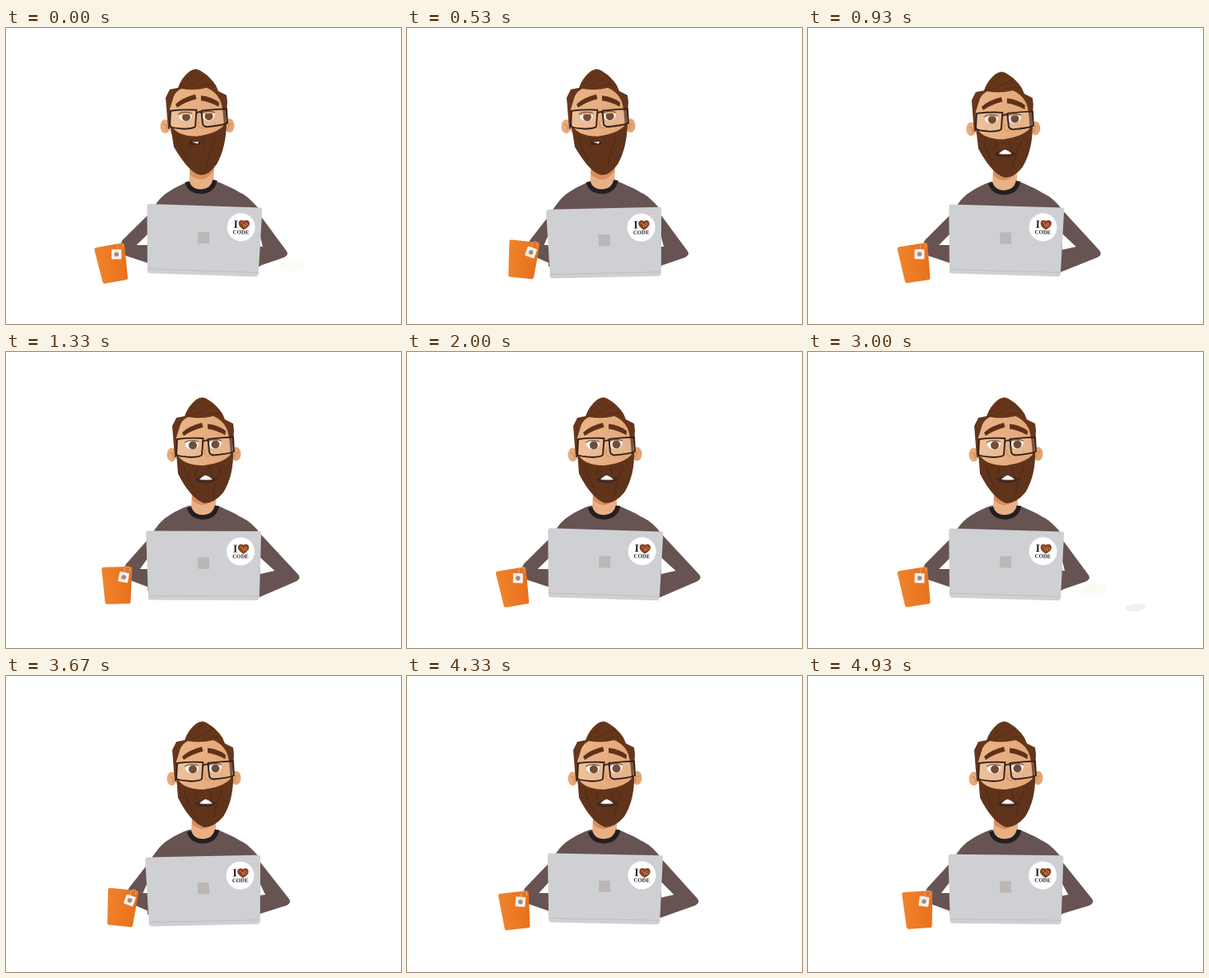
These frames come from a looping animation (480 px wide and 360 px high, 5 s). An HTML page:

```html
<!DOCTYPE html>
<html lang="en">
<head>
<meta charset="utf-8">
<title>Typing at the laptop</title>
<style>
  html, body { margin: 0; width: 100%; height: 100%; overflow: hidden; background: #fff; }
  svg { display: block; width: 480px; height: 360px; }
  text { font-family: "Liberation Serif", "Noto Serif", serif; font-weight: bold; fill: #2a2222; text-anchor: middle; }
</style>
</head>
<body>
<svg viewBox="0 0 480 360">
  <defs>
    <linearGradient id="skin">
      <stop offset="0" stop-color="#ebb588"/>
      <stop offset="1" stop-color="#e2a678"/>
    </linearGradient>
    <linearGradient id="orange">
      <stop offset="0" stop-color="#f0832d"/>
      <stop offset="1" stop-color="#e86f1b"/>
    </linearGradient>
  </defs>

  <ellipse id="slip" cx="347" cy="289" rx="16" ry="7" fill="#fbfbf5"/>
  <ellipse id="spot" cx="398" cy="311" rx="12.5" ry="4.5" fill="#f0f0f0" transform="rotate(-4 398 311)"/>

  <!-- body -->
  <path d="M222 187C206 193 194 200 186 209L172 228V290H309V222C299 209 285 198 257 187Z" fill="#665352"/>
  <path id="leftArm" fill="#665352"/>
  <path id="rightArm" fill="#665352"/>
  <path id="leftGap" fill="#fff"/>
  <path id="rightGap" fill="#fff"/>

  <g id="neck">
    <path d="M226 172L225 190Q228 199 240 199Q252 199 255 188V170Z" fill="#e9b085"/>
    <path d="M226 180Q241 194 255 176V171H226Z" fill="#d58f61"/>
    <path d="M222.500 189Q226 201 240 201Q254 200 256.500 187" fill="none" stroke="#231f20" stroke-width="5.500"/>
  </g>

  <g id="head">
    <ellipse cx="201.500" cy="125" rx="6" ry="8.500" fill="#e8ab7d"/>
    <ellipse cx="279.500" cy="124" rx="6" ry="8.500" fill="#e2a576"/>
    <path d="M199 123Q204 121 203 130M282 122Q277 121 278 129" fill="none" stroke="#c6814f"/>
    <path d="M205 128L202 90L207 80L217 78Q221 66 231 58Q238 53 244 57Q256 64 263 75L266 82L276 87L277 95L275 128Z" fill="#66361b"/>
    <path d="M218 79Q235 75 253 63M222 75Q232 64 239 57M261 74Q250 73 240 77" fill="none" stroke="#522a12" stroke-width=".8"/>
    <path d="M207 130V104L212 88Q215 82 221 79Q236 82 252 78Q262 82 267 91Q272 98 273 130Q267 144 240 144Q214 143 207 130Z" fill="url(#skin)"/>

    <path d="M214 98Q222 90 238 86L239.500 91.500Q226 95 216 102Z" fill="#5e3118"/>
    <path d="M245 87.500Q259 89 267 96L266.500 101Q256 95 245 93.500Z" fill="#5e3118"/>

    <path d="M218 113Q218 108 224 108L234 110Q234 118 227 118.500Q219 118 218 113ZM246 112Q247 108 253 107L262 109Q262 116 255 118Q248 118 246 112Z" fill="#fffaf5"/>
    <g id="pupils" fill="#59301b">
      <circle cx="227" cy="113.500" r="5"/>
      <circle cx="254.500" cy="112.500" r="5"/>
    </g>
    <path id="lids" d="M217 104H235V111Q225 109 217 112ZM245 103H263V109.500Q253 108 245 111Z" fill="#dda071"/>
    <path d="M217 110Q224 106 234 109M245 109Q253 105 262 108" fill="none" stroke="#70401f" stroke-width="1.200"/>
    <path d="M242 119Q240 128 248 127M259 126L262 125V120" fill="none" stroke="#cf8955" stroke-width=".9"/>

    <path id="beard" fill="#60331b"/>
    <path d="M216 139Q220 154 228 166M233 140L230 151M262 140Q254 158 252 173M247 139L250 150" fill="none" stroke="#4a2511" stroke-width=".8"/>
    <g id="smallMouth">
      <path d="M230 144Q238 141 246 145Q240 149 233 147Z" fill="#452213"/>
      <path d="M234 144L242 143.500L241 146Z" fill="#fff"/>
    </g>
    <g id="bigMouth">
      <path d="M229 155Q242 147 257 155Q249 160 242 159Q234 160 229 155Z" fill="#432a20"/>
      <path d="M235 155Q240 150 243 150Q247 151 251 155Q243 156 235 155Z" fill="#fff"/>
    </g>

    <g fill="rgba(255,255,255,.14)" stroke="#33221c" stroke-width="1.900" stroke-linejoin="round">
      <path d="M208 106Q224 104 239.500 105L238 125Q237 127.500 225 128Q210 127 207 125Z"/>
      <path d="M245.500 106Q262 104 276 103.500L277 121Q270 124 252 125.500Q248 125 247 122Z"/>
      <path d="M239.500 109Q243 106 246 108.500" fill="none"/>
    </g>
  </g>

  <g id="laptop">
    <path d="M173 218H308Q310 218 310 221L308 299Q307 302 304 302H176Q173 302 173 299L170 221Q170 218 173 218Z" fill="#cfd0d4"/>
    <path d="M173 297H308" stroke="#b9babe" stroke-width=".8"/>
    <rect x="233" y="250" width="14" height="14" fill="#bcb7b5"/>
    <circle cx="285" cy="242.500" r="17" fill="#fff"/>
    <text x="278.500" y="243.500" font-size="13.500">I</text>
    <path d="M288.500 245C278 239 283 231.500 288.500 235.500C294 231.500 299 239 288.500 245Z" fill="#8a4222" stroke="#7a3a20"/>
    <path d="M285 236.500L289 241M291 236.500L288 242M293 238L290 242" stroke="#e58a4c" stroke-width="1.300" stroke-dasharray="1.500 1"/>
    <text x="285" y="250.700" font-size="6.800">CODE</text>
  </g>

  <g id="cup">
    <path d="M-16 -22.500H16Q19 -22.500 18.500 -19L15.500 20Q15.500 22.500 13 22.500H-13Q-15.500 22.500 -15.500 20L-18.500 -19Q-19 -22.500 -16 -22.500Z" fill="url(#orange)"/>
  </g>
  <path id="string" fill="none" stroke="#cfb09c"/>
  <g id="tag">
    <rect x="-6" y="-6" width="12" height="12" rx="1" fill="#f6f1ee"/>
    <circle r="2.800" fill="#a58a7c"/>
  </g>
</svg>

<script>
const LOOP = 5000, ROCK = 1037;
const el = id => document.getElementById(id);
const set = (id, name, value) => el(id).setAttribute(name, value);
const move = (id, value) => set(id, "transform", value);
const mix = (a, b, k) => a + (b - a) * k;
const clamp = x => Math.min(1, Math.max(0, x));
const smooth = x => (x = clamp(x), x * x * (3 - 2 * x));
const show = (id, amount) => set(id, "opacity", +amount);

// Right elbow: time and reach, 0 = tucked in, 1 = out
const reach = [
  [0, 0], [270, 1], [530, 0], [900, 1], [1100, .2], [1330, 1], [1660, .2], [2000, 1],
  [2270, .2], [2600, 1], [3000, 0], [3400, 1], [3750, .1], [4150, 1], [4240, .7],
  [4330, .85], [4550, 1], [4800, .8], [4930, .3], [5000, 0]
];

function along(keys, t) {
  const i = Math.max(1, keys.findIndex(k => k[0] >= t));
  const [t0, a] = keys[i - 1], [t1, b] = keys[i];
  return mix(a, b, smooth((t - t0) / (t1 - t0)));
}

// Both face poses share one outline, so the points can be blended
const beardDown = [207, 120, 213, 137, 240, 137, 270, 133, 276, 118, 276, 150, 264, 171, 254, 185, 244, 184, 231, 182, 212, 150];
const beardUp = [207, 122, 213, 138, 240, 138, 270, 134, 276, 120, 277, 150, 264, 171, 253, 184, 241, 184, 224, 178, 209, 148];

function beard(k) {
  const p = beardDown.map((a, i) => mix(a, beardUp[i], k).toFixed(2));
  return `M${p[0]} ${p[1]}Q${p.slice(2, 6)}Q${p.slice(6, 10)}Q${p.slice(10, 14)}Q${p.slice(14, 18)}Q${p.slice(18)} ${p[0]} ${p[1]}Z`;
}

function draw(t) {
  const a = t / ROCK * 2 * Math.PI;
  const v = -Math.cos(a) - .15 * Math.sin(a) ** 2;
  const up = smooth((t - 600) / 580);

  move("head", `translate(${8 * (up - 1)} ${5.3 * (up - 1)})`);
  move("neck", `translate(${2.5 * (up - 1)} ${2 * (up - 1)})`);
  show("lids", 1 - up);
  set("beard", "d", beard(up));
  show("smallMouth", up < .5);
  show("bigMouth", up >= .5);

  const lx = 145.5 + 4 * v;
  set("leftArm", "d", `M196 202Q186 207 175 225L${lx} 258Q${lx - 5} 266 ${lx + 1} 276L173 286L190 250Z`);
  set("leftGap", "d", `M172 251L${lx + 17} 264L172 264Z`);

  const out = along(reach, t), rx = mix(343, 357.5, out);
  const cuff = 290 + 9 * out ** 4;
  set("rightArm", "d", `M286 201Q299 207 309 ${mix(228, 221, out)}L${rx - 3} 270Q${rx + 2} 275 ${rx - 5} 279L306 ${cuff}L290 250Z`);
  set("rightGap", "d", `M309 ${mix(254, 250, out)}L${rx - 31} 266L309 ${mix(266, 270, out)}Z`);

  move("laptop", `rotate(${.3 - 1.6 * v} 292 262)`);

  const cx = 135 + 5.8 * v, cy = 284 - 2.4 * v;
  move("cup", `translate(${cx} ${cy}) rotate(${8 * v - 2})`);
  const tx = 142.5 + 8.2 * v, ty = 274 - 1.2 * v;
  move("tag", `translate(${tx} ${ty}) rotate(${10 + 10 * v})`);
  set("string", "d", `M${tx + 1} ${ty - 6}Q${tx} ${ty - 13} ${tx + 5} ${ty - 13}Q${tx + 9} ${ty - 13} ${tx + 7} ${ty - 7}`);

  show("slip", t < 300 || t > 2700 && t < 3500);
  show("spot", t > 2450 && t < 3500);
}

const start = performance.now();
function frame(now) {
  draw(Math.max(0, now - start) % LOOP);
  requestAnimationFrame(frame);
}
draw(0);
requestAnimationFrame(frame);
</script>
</body>
</html>
```
